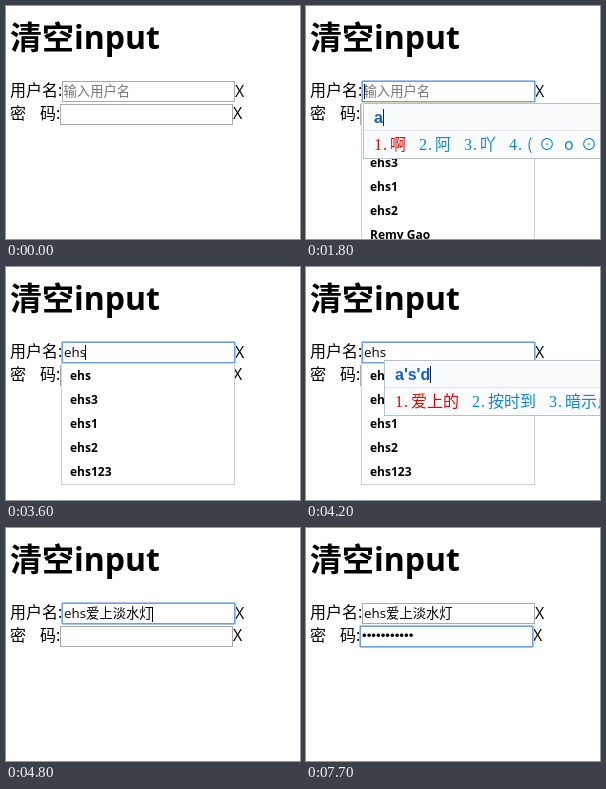
Recreate the animation shown at these times as an HTML page. Size 294 by 233 pixels, loop 8000 ms.

```html
<!DOCTYPE html>
<html lang="zh">
<head>
<meta charset="utf-8">
<title>清空input</title>
<style>
  html, body { margin: 0; width: 100%; height: 100%; overflow: hidden; background: #fff; }
  svg { display: block; }
  text { font-family: "Open Sans", "Noto Sans CJK SC", "Noto Sans CJK", sans-serif; white-space: pre; }
  .title { font-size: 32px; font-weight: 700; }
  .label { font-size: 16px; }
  .field { font-size: 13.333px; }
  .hint { fill: #757575; }
  .dots { font: 13.333px "Liberation Sans", Arial, sans-serif; }
  .item { font-size: 12px; font-weight: 700; }
  .typed { font: 700 16px "Liberation Sans", Arial, sans-serif; fill: #0b5fc6; }
  .word { font-family: "Noto Sans CJK SC", "Noto Sans CJK", "DejaVu Sans", sans-serif; font-size: 16px; font-weight: 300; }
  .num { font: 16px "Liberation Serif", "Times New Roman", serif; }
</style>
</head>
<body>
<svg id="stage" width="294" height="233" viewBox="0 0 294 233"></svg>
<script>
const LOOP = 8000;
const stage = document.getElementById('stage');

const user = 'ehs';
const phrase = '爱上淡水灯';
const saved = ['ehs', 'test', 'ehs3', 'ehs1', 'ehs2', 'Remy Gao', 'ehs123'];
const matching = saved.filter(s => s.startsWith(user));

const words = {
  "a": ['啊', '阿', '吖', '(⊙o⊙'],
  "a'b": ['阿布', '安保', '阿爸', '熬吧'],
  "a'b'c": ['阿爸吃', '安保处', '按表查'],
  "a's": ['爱上', '按时', '暗示', '奥数'],
  "a's'd": ['爱上的', '按时到', '暗示点'],
  "a's'd's": ['爱上淡水', '按时到手', '暗示都是'],
  "a's'd's'd": [phrase, '按时到手的', '暗示都是对']
};

// Each step changes part of the state; caret is the x of the text cursor.
const steps = [
  [0, { focus: 0, caret: 0, value: '', list: null, ime: '', dots: 0 }],
  [700, { focus: 1, caret: 58 }],
  [800, { list: saved }],
  [1100, { caret: 0 }],
  [1800, { caret: 58, ime: "a" }],
  [2100, { caret: 0 }],
  [2600, { caret: 58 }],
  [3100, { caret: 0, ime: "a'b" }],
  [3300, { ime: "a'b'c" }],
  [3500, { caret: 79, ime: '', value: user }],
  [3600, { list: matching }],
  [4000, { caret: 0, ime: "a" }],
  [4100, { ime: "a's" }],
  [4200, { ime: "a's'd" }],
  [4300, { ime: "a's'd's" }],
  [4400, { ime: "a's'd's'd" }],
  [4600, { ime: '', value: user + phrase }],
  [4700, { list: null }],
  [4800, { caret: 146 }],
  [5200, { caret: 0 }],
  [5700, { caret: 146 }],
  [6000, { focus: 2, caret: 56 }],
  [6500, { caret: 61, dots: 1 }],
  [6900, { caret: 70, dots: 3 }],
  [7000, { caret: 84, dots: 6 }],
  [7100, { caret: 98, dots: 9 }],
  [7200, { caret: 107, dots: 11 }],
  [7700, { caret: 0 }]
];

const text = (cls, x, y, s, fill = '') =>
  `<text class="${cls}" x="${x}" y="${y}"${fill && ` fill="${fill}"`}>${s}</text>`;
const rect = (x, y, w, h, fill) =>
  `<rect x="${x}" y="${y}" width="${w}" height="${h}" fill="${fill}"/>`;
const frame = (x, y, w, h, stroke, fill = 'none', r = 0) =>
  `<rect x="${x + .5}" y="${y + .5}" width="${w - 1}" height="${h - 1}" rx="${r}" fill="${fill}" stroke="${stroke}"/>`;

function field(x, y, focused) {
  if (!focused) return frame(x, y, 173, 21, '#a9a9a9', '#fff');
  return frame(x - 1, y - 1, 175, 23, '#a3c3f3', '#fff', 1.5) + frame(x, y, 173, 21, '#6f9fe6');
}

function dropdown(items) {
  return frame(55, 96, 174, items.length * 24 + 2, '#d0d0d0', '#fff') +
    items.map((s, i) => text('item', 64, 113 + i * 24, s)).join('');
}

function candidate(word, i, x, y) {
  const color = i ? '#0f86d8' : '#e60000';
  const spots = word[0] === '(' ? [18, 30, 55, 72] : [...word].map((c, k) => 16 + k * 16);
  return text('num', x, y, i + 1, color) + text('num', x + 9, y, '.', color) +
    [...word].map((c, k) => text('word', x + spots[k], y, c, color)).join('');
}

function imePanel(typed, x, y) {
  const list = words[typed];
  const step = 29 + list[0].length * 16;
  const width = [...typed].reduce((w, c) => w + ({ "'": 3.8, b: 9.8, d: 9.8 }[c] || 8.9), 0);
  return frame(x, y, 400, 56, '#b3c3cd', '#fbfcfd') +
    rect(x + 1, y + 27, 398, 1, '#dfe5e9') +
    text('typed', x + 11, y + 20, typed) +
    rect(Math.round(x + 11 + width), y + 6, 1, 17, '#222') +
    list.map((w, i) => candidate(w, i, x + 11 + i * step, y + 47)).join('');
}

function draw(s) {
  let out = rect(0, 0, 294, 233, '#fff') +
    text('title', 4, 43, '清空input') +
    text('label', 4, 90, '用户名:') + text('label', 229, 91, 'X') +
    text('label', 4, 113, '密') + text('label', 34, 113, '码:') + text('label', 227, 113, 'X') +
    field(56, 75, s.focus === 1) + field(54, 98, s.focus === 2);
  out += s.value ? text('field', 58, 90, s.value) : text('field hint', 57.5, 90, '输入用户名');
  if (s.dots) out += text('dots', 56, 112, '•'.repeat(s.dots));
  if (s.caret) out += rect(s.caret, s.focus === 2 ? 101 : s.caret > 100 ? 79 : 78, 1, 15, '#000');
  if (s.list) out += dropdown(s.list);
  if (s.ime) out += s.value ? imePanel(s.ime, 78, 93) : imePanel(s.ime, 57, 97);
  stage.innerHTML = out;
}

let shown = -1;
function tick() {
  const t = performance.now() % LOOP;
  const count = steps.filter(([at]) => at <= t).length;
  if (count !== shown) {
    shown = count;
    draw(Object.assign({}, ...steps.slice(0, count).map(([, change]) => change)));
  }
  requestAnimationFrame(tick);
}
tick();
</script>
</body>
</html>
```
